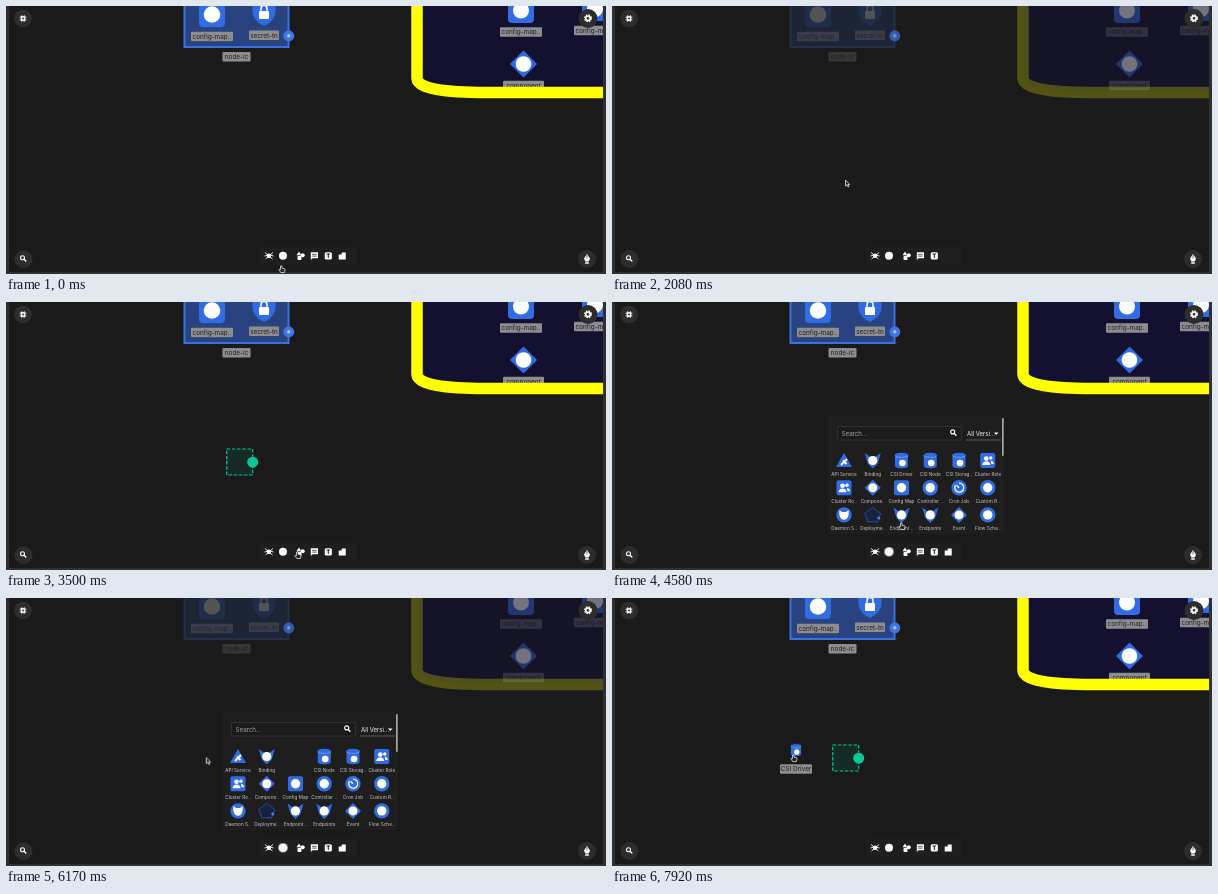
An HTML page for the animation above (8000 ms loop, 600x268 px).

```html
<!DOCTYPE html>
<html lang="en">
<head>
<meta charset="utf-8">
<title>Canvas designer</title>
<style>
html, body { margin: 0; width: 100%; height: 100%; overflow: hidden; background: #1a1a1a; }
svg { display: block; width: 100%; height: 100%; font-family: Inter, "Open Sans", sans-serif; }
.anim, .dim { animation: 8s linear infinite; }
.dim { animation-name: dim; --d: .25; }
.cursor { animation-name: move; }
.hand { animation-name: hand; animation-timing-function: step-end; }
.arrow { animation-name: arrow; animation-timing-function: step-end; }
.section { animation-name: section; animation-timing-function: step-end; }
.panel { animation-name: panel; }
.dragTool { animation-name: dragTool; animation-timing-function: step-end; }
.kube { animation-name: kube; transform-origin: 277px 249.8px; }
.dragItem { animation-name: dragItem; }
.node { animation-name: node; animation-timing-function: step-end; }
.halo { animation-name: halo; }
.nodeIcon { animation-name: nodeIcon; }
.nodeLabel { animation-name: nodeLabel; }

@keyframes dim {
  0%, 19% { opacity: 1; }
  21.5%, 28% { opacity: var(--d); }
  30.5%, 71.5% { opacity: 1; }
  73.5%, 83.5% { opacity: var(--d); }
  85%, 100% { opacity: 1; }
}
@keyframes move {
  0%, 1% { transform: translate(276px, 263px); }
  6.25%, 8.4% { transform: translate(314px, 258px); }
  14%, 18.75% { transform: translate(336px, 251px); animation-timing-function: ease-in-out; }
  25.5%, 28.1% { transform: translate(234px, 177px); animation-timing-function: ease-in-out; }
  37.5% { transform: translate(277px, 226px); }
  43.2%, 44% { transform: translate(292px, 253px); }
  46%, 49% { transform: translate(277px, 252px); animation-timing-function: ease-in-out; }
  56.5%, 59.4% { transform: translate(290px, 224px); animation-timing-function: ease-in-out; }
  68.75%, 71% { transform: translate(295px, 166px); animation-timing-function: ease-in-out; }
  79%, 80.2% { transform: translate(189px, 162px); }
  82.2%, 87% { transform: translate(185px, 168px); }
  93%, 100% { transform: translate(182px, 160px); }
}
@keyframes hand {
  0% { opacity: 1; } 19% { opacity: 0; } 40% { opacity: 1; }
  71.5% { opacity: 0; } 84.4%, 100% { opacity: 1; }
}
@keyframes arrow {
  0% { opacity: 0; } 19% { opacity: 1; } 40% { opacity: 0; }
  71.5% { opacity: 1; } 84.4%, 100% { opacity: 0; }
}
@keyframes section { 0% { opacity: 0; } 28.1%, 100% { opacity: 1; } }
@keyframes panel {
  0%, 45.7% { opacity: 0; } 47.5%, 96% { opacity: 1; } 98%, 100% { opacity: 0; }
}
@keyframes dragTool { 0% { opacity: 1; } 19.5% { opacity: 0; } 28.1%, 100% { opacity: 1; } }
@keyframes kube {
  0%, 45% { transform: none; } 47%, 96% { transform: scale(1.15); } 98%, 100% { transform: none; }
}
@keyframes dragItem {
  0%, 71.4% { opacity: 1; transform: none; }
  71.5%, 84.3% { opacity: 0; transform: translateY(12px); }
  84.4%, 85.8% { opacity: 1; transform: translateY(12px); }
  88%, 100% { opacity: 1; transform: none; }
}
@keyframes node { 0% { opacity: 0; } 84.4%, 100% { opacity: 1; } }
@keyframes halo { 0%, 89% { opacity: 1; } 91.5%, 100% { opacity: 0; } }
@keyframes nodeIcon {
  0%, 89% { transform: translate(184px, 151.5px) scale(1.05); }
  91.5%, 100% { transform: translate(184px, 152px) scale(.78); }
}
@keyframes nodeLabel {
  0%, 89% { transform: translate(184px, 174px); }
  91.5%, 100% { transform: translate(184px, 171px); }
}
</style>
</head>
<body>
<svg viewBox="0 0 600 268" preserveAspectRatio="none">
  <defs>
    <g id="triangle"><path d="M0-7.5L8 6.5H-8Z" fill="#326ce5"/><path d="M-3 4.500L3-1.500M-1 0L2.500 3.500" stroke="#fff" stroke-width="2"/></g>
    <g id="fox"><path d="M-8-7.500L-3-4H3L8-7.500L5 3L0 8L-5 3Z" fill="#326ce5"/><circle r="4.600" fill="#fff"/></g>
    <g id="drum"><path d="M-6.500-5.500C-6.500-8.500 6.500-8.500 6.500-5.500V5.500C6.500 8.500-6.500 8.500-6.500 5.500Z" fill="#326ce5"/><path d="M-6.500-5C-6.500-2.500 6.500-2.500 6.500-5" fill="none" stroke="#7ea3f0" stroke-width=".8"/><circle cx="1" cy="2.500" r="3.300" fill="#fff"/></g>
    <g id="people"><rect x="-7.500" y="-7.500" width="15" height="15" rx="2" fill="#326ce5"/><g fill="#fff"><circle cx="-1.500" cy="-2" r="2.300"/><path d="M-5.500 4.500Q-5 .8-1.500.8T2.500 4.500Z"/><circle cx="3" cy="-2.500" r="1.700"/><path d="M3 .3Q6 .5 6 3.500H3.500Z"/></g></g>
    <g id="diamond"><path d="M0-8L8 0L0 8L-8 0Z" fill="#326ce5"/><circle r="4.500" fill="#fff"/></g>
    <g id="square"><rect x="-7.500" y="-7.500" width="15" height="15" rx="2" fill="#326ce5"/><circle r="4.700" fill="#fff"/></g>
    <g id="disc"><circle r="7.700" fill="#326ce5"/><circle r="4.700" fill="#fff"/></g>
    <g id="clock"><circle r="7.700" fill="#326ce5"/><path d="M-3.500-2.500A4.500 4.500 0 1 0 0-4.500M0 0L-2.500-2.500" fill="none" stroke="#fff" stroke-width="1.300"/></g>
    <g id="daemon"><circle r="7.700" fill="#326ce5"/><path d="M-4.500-5L-2-3H2L4.500-5Q5.500 0 3 3.500Q0 6-3 3.500Q-5.500 0-4.500-5Z" fill="#fff"/></g>
    <g id="pentagon"><path d="M0-7.500L7.800-1.500L5 7H-5L-7.800-1.500Z" fill="#17223f" stroke="#2a4c9c"/><circle cx="6" cy="3" r="1.500" fill="#4a7de8"/></g>
    <g id="lens" fill="none" stroke="#fff"><circle cx="-.8" cy="-.8" r="2" stroke-width="1.100"/><path d="M.8.8L3 3" stroke-width="1.300"/></g>
  </defs>

  <rect width="600" height="268" fill="#1a1a1a"/>

  <g id="canvas">
    <g class="dim">
      <rect x="178.500" y="-10" width="104" height="51" fill="#28437f" stroke="#3d72de" stroke-width="2"/>
      <rect x="193" y="-8" width="26" height="29" rx="4" fill="#326ce5"/><circle cx="206" cy="8.500" r="8.300" fill="#fff"/>
      <path d="M246.500-8H269.500V5Q269 15 258 20Q247 15 246.500 5Z" fill="#326ce5"/>
      <rect x="253" y="5" width="10" height="8" rx="1" fill="#fff"/>
      <path d="M255 5.500V2.500A3 3 0 0 1 261 2.500V5.500" fill="none" stroke="#fff" stroke-width="1.500"/>
    </g>
    <g class="dim" style="--d:.7"><circle cx="282.800" cy="29.800" r="5.500" fill="#3f74e2"/><circle cx="282.800" cy="29.800" r="1.800" fill="#a9c2f6"/></g>
    <path class="dim" style="--d:.6" d="M411-8V70C412 82 440 86 480 86H600V-8Z" fill="#13112f"/>
    <g class="dim" style="--d:.4">
      <rect x="502" y="-10" width="26" height="27" rx="4" fill="#326ce5"/><circle cx="515" cy="4.500" r="8" fill="#fff"/>
      <rect x="576" y="-10" width="26" height="25" rx="4" fill="#326ce5"/><circle cx="589" cy="3" r="8" fill="#fff"/>
      <path d="M517.500 44.500L531 58L517.500 71.500L504 58Z" fill="#326ce5"/><circle cx="517.500" cy="58" r="7.800" fill="#fff"/>
    </g>
  </g>

  <g class="anim section">
    <rect x="220.700" y="147" width="26" height="26" fill="#162b25" stroke="#00c795" stroke-width="1.200" stroke-dasharray="3.500 1.700"/>
    <circle cx="246.700" cy="160.200" r="5.500" fill="#0cc896"/>
  </g>

  <g class="anim node">
    <g class="anim halo"><circle cx="184" cy="151.300" r="15.500" fill="#9c9c9c" stroke="#3d72de" stroke-width="1.800"/><circle cx="184" cy="151.300" r="11.500" fill="#b0aca6"/></g>
    <g class="anim nodeIcon"><use href="#drum"/></g>
    <g class="anim nodeLabel" id="nodeLabel"></g>
  </g>

  <g class="anim panel">
    <rect x="216" y="114" width="176" height="118" rx="2" fill="#1e1e1e"/>
    <rect x="225.500" y="124.500" width="124" height="13.500" rx="1.500" fill="#1b1b1b" stroke="#363636" stroke-width=".8"/>
    <text x="229.500" y="133.500" font-size="6.200" fill="#a5a5a5">Search...</text>
    <use href="#lens" x="341.500" y="130.700"/>
    <text x="355" y="133.800" font-size="6" fill="#f0f0f0">All Versi...</text>
    <path d="M354 138H389" stroke="#777" stroke-width=".7"/>
    <path d="M382 130.500H386.500L384.250 133Z" fill="#fff"/>
    <rect x="390" y="116" width="1.700" height="38" rx=".8" fill="#a6a6a6"/>
    <g id="grid" font-size="4.700" fill="#c8c8c8" text-anchor="middle"></g>
  </g>

  <g fill="#fff">
    <rect x="254" y="241" width="97" height="17.500" rx="3" fill="#1e1e1e"/>
    <circle cx="263" cy="249.800" r="2.200"/>
    <path d="M259 246.500L262 249L258.500 250M259.500 253L263 250L266.500 253M267 246.500L264 249L267.500 250" fill="none" stroke="#fff" stroke-width=".9"/>
    <circle class="anim kube" cx="277" cy="249.800" r="4"/>
    <path d="M293 245.500L295.300 249.300H290.500Z"/><circle cx="296.700" cy="249.300" r="2"/><rect x="291.500" y="250" width="4" height="4" rx="1"/>
    <path d="M304.800 246.300H312V252.200H306.500L304.800 254Z"/><path d="M306 248.300H310.800M306 250.100H310.800" stroke="#1e1e1e" stroke-width=".7"/>
    <rect x="318.700" y="246.200" width="7.200" height="7.200" rx="1.500"/><path d="M320.500 248H324.100M322.300 248V252" stroke="#1e1e1e" stroke-width="1"/>
    <path class="anim dragTool" d="M332.700 248.500H335.700V246.500H339.700V253.500H332.700Z"/>
  </g>

  <g fill="#2d2d2d">
    <circle cx="17" cy="12.500" r="9"/><circle cx="582" cy="12.500" r="9.500"/>
    <circle cx="17.500" cy="253" r="9"/><circle cx="581" cy="253" r="9"/>
  </g>
  <g fill="none" stroke="#fff">
    <rect x="15.300" y="10.800" width="3.400" height="3.400" stroke-width="1.200"/>
    <path d="M15.700 9V16M18.300 9V16M13.500 11.200H20.500M13.500 13.800H20.500" stroke-width=".7"/>
    <circle cx="582" cy="12.300" r="2.200" stroke-width="1.700"/>
    <circle cx="582" cy="12.300" r="3.400" stroke-width="1.200" stroke-dasharray="1.600 1.070"/>
    <use href="#lens" x="17.300" y="252.500"/>
  </g>
  <path d="M581 248L584 252.500L582.700 255.500H579.300L578 252.500ZM579.200 256.200H582.800V257.700H579.200Z" fill="#fff"/>
  <path d="M581 249V252.500" stroke="#2d2d2d" stroke-width=".7"/>
  <path d="M0 0H3V268H0ZM597 0H600V268H597ZM3 266H597V268H3Z" fill="#303030"/>

  <g class="anim cursor" stroke="#fff" stroke-width=".7" stroke-linejoin="round" fill="#222">
    <path class="anim hand" d="M-1.500-3Q-.7-4 0-3V-.8L2.500-.2Q3.200 0 3 1L2.400 3.500H-1.200L-3.200.8Q-3-.3-1.500.7Z"/>
    <path class="anim arrow" d="M-.5-3V3L.9 1.800L2 4L2.900 3.600L1.900 1.500H3.700Z"/>
  </g>
</svg>
<script>
const NS = 'http://www.w3.org/2000/svg';
const byId = id => document.getElementById(id);

function add(parent, tag, attrs, text) {
  const el = document.createElementNS(NS, tag);
  for (const key in attrs) el.setAttribute(key, attrs[key]);
  if (text) el.textContent = text;
  parent.append(el);
  return el;
}

function tag(parent, text, x, y, width) {
  add(parent, 'rect', { x: x - width / 2, y: y - 4.8, width, height: 9.600, rx: 1, fill: '#8d8d90' });
  add(parent, 'text', { x, y: y + 2.2, 'font-size': 6.4, fill: '#202024', 'text-anchor': 'middle' }, text);
}

const canvas = byId('canvas');
for (const [text, x, y, width] of [
  ['config-map..', 206, 30.5, 42], ['secret-tn', 258, 29.3, 30], ['node-ic', 230.5, 50.7, 28],
  ['config-map..', 515, 26, 42], ['config-map..', 589, 24.5, 42], ['component', 517.5, 79.5, 41]
]) tag(add(canvas, 'g', { class: 'dim' }), text, x, y, width);

add(canvas, 'path', {
  class: 'dim', d: 'M411-8V72C411 83 440 86.500 480 86.500H600',
  fill: 'none', stroke: '#ffff00', 'stroke-width': 11.5
});
tag(byId('nodeLabel'), 'CSI Driver', 0, 0, 32);

const items = [
  ['API Service', 'triangle'], ['Binding', 'fox'], ['CSI Driver', 'drum'],
  ['CSI Node', 'drum'], ['CSI Storag..', 'drum'], ['Cluster Role', 'people'],
  ['Cluster Ro..', 'people'], ['Compone..', 'diamond'], ['Config Map', 'square'],
  ['Controller ..', 'disc'], ['Cron Job', 'clock'], ['Custom R..', 'disc'],
  ['Daemon S..', 'daemon'], ['Deployme..', 'pentagon'], ['Endpoint ..', 'fox'],
  ['Endpoints', 'fox'], ['Event', 'diamond'], ['Flow Sche..', 'disc']
];
items.forEach(([name, icon], i) => {
  const x = 232 + (i % 6) * 28.75, y = 158.5 + Math.floor(i / 6) * 27.2;
  const item = add(byId('grid'), 'g', name === 'CSI Driver' ? { class: 'anim dragItem' } : {});
  add(item, 'use', { href: '#' + icon, x, y });
  add(item, 'text', { x, y: y + 15.3 }, name);
});

// The two end strips stay above the canvas, so the bright border stops at the stage edge.
</script>
</body>
</html>
```
